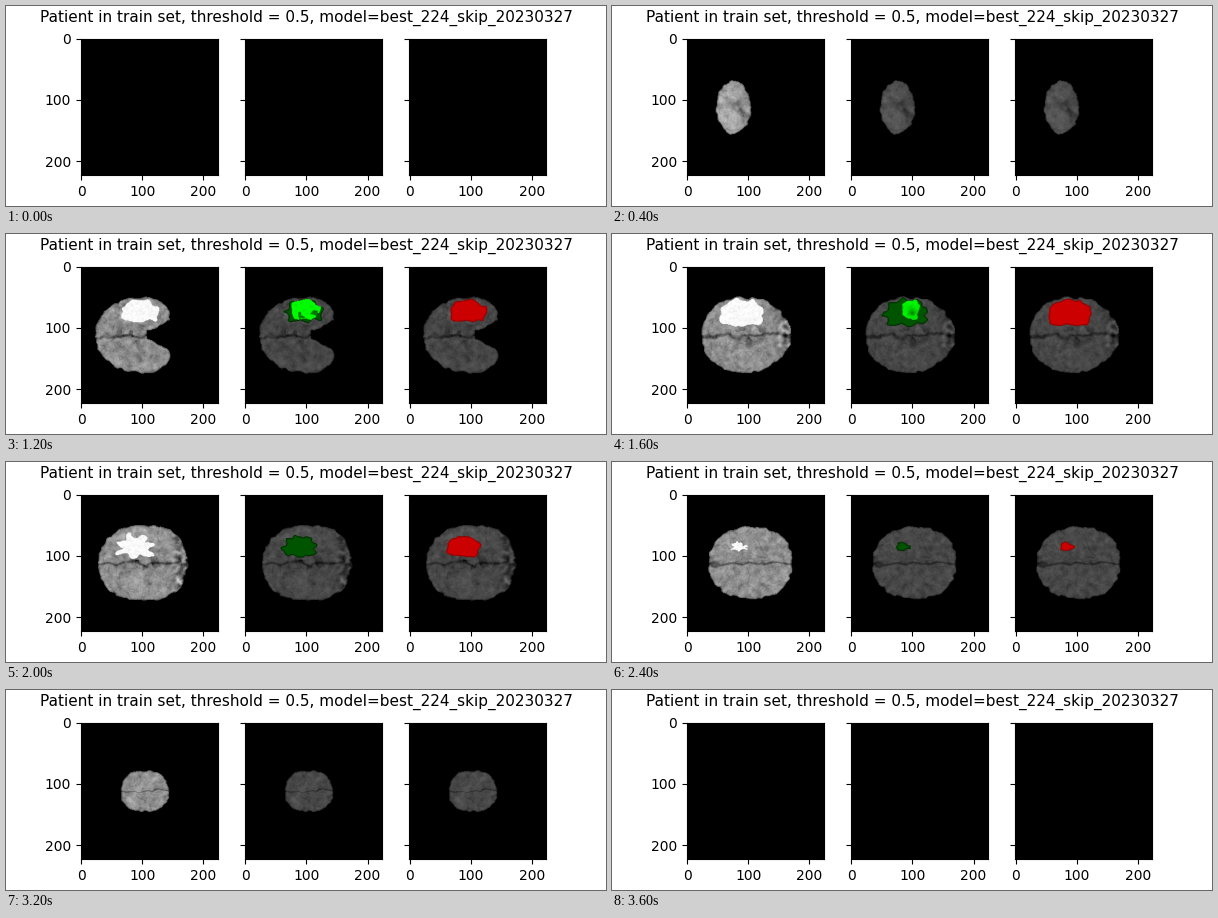
These frames come from a looping animation (600 by 200 pixels, 4 s). A matplotlib script:

```python
import numpy as np
import matplotlib.pyplot as plt
from matplotlib.animation import FuncAnimation

N = 224
STEP = 200
FRAMES = 20
LAST = 17  # last slice that shows tissue
SCALE = 136.76 / N

# pixel centres in stage coordinates of the left panel
AXIS = (np.arange(N) + 0.5) * SCALE
X, Y = np.meshgrid(75 + AXIS, 32.6 + AXIS)
FREQ = np.fft.fftfreq(N)
K2 = FREQ[:, None] ** 2 + FREQ[None, :] ** 2


def noise(rng, size):
    """Smooth random field with unit spread."""
    spec = np.fft.fft2(rng.standard_normal((N, N)))
    field = np.fft.ifft2(spec * np.exp(-20 * K2 * size ** 2)).real
    return field / field.std()


def bump(x, y, cx, cy, rx, ry):
    return np.exp(-((x - cx) / rx) ** 2 - ((y - cy) / ry) ** 2)


def erode(mask, steps):
    for _ in range(steps):
        mask = (mask & np.roll(mask, 1, 0) & np.roll(mask, -1, 0)
                & np.roll(mask, 1, 1) & np.roll(mask, -1, 1))
    return mask


def extent(i):
    """Centre and half size of the section through the head."""
    if i <= 4:
        return 121.5, 101.5, 22 - 9.5 / i, 29 - 6.5 / i
    ry = 38 * np.sqrt(1 - (abs(i - 7.5) / 9.7) ** 2.6)
    if i <= 7:
        return 126.5, 101.5, .98 * ry, ry
    return min(139, 126.5 + i), 101.5, 1.19 * ry, ry


def outline(i, u, v):
    """Egg with its own roundness at the left and right end."""
    keys = [4, 6, 8, 10, 14]
    left = np.interp(i, keys, [2, 2, 2.3, 2.3, 2.8])
    right = np.interp(i, keys, [2.2, 3.5, 1.7, 3.2, 2.3])
    peak = np.interp(i, keys, [0, .2, 0, 0, 0])
    cleft = 5 <= i <= 7
    end = 1.12 if cleft else 1
    t = np.where(u < peak, (peak - u) / (1 + peak), (u - peak) / (end - peak))
    half = np.sqrt(np.clip(1 - t ** np.where(u < peak, left, right), 0, 1))
    mask = (np.abs(v) < half) & (u < 1)
    if cleft:
        wall = .4 + .2 * (i - 6)
        mask &= (u < wall) | (np.abs(v) > .12 + .45 * (u - wall))
    return mask


def small_lobes(gray, wx, wy, texture):
    """Side lobe and the tips of the temporal lobes."""
    for cx, cy, rx, ry in [(100, 93, 6, 9), (148, 77, 6, 6),
                           (153, 86, 6, 4), (152, 119.5, 5, 5)]:
        r2 = ((wx - cx) / rx) ** 2 + ((wy - cy) / ry) ** 2
        part = (r2 < 1) & (gray == 0)
        gray[part] = (.62 - .2 * r2 + texture)[part]
    gray -= .4 * bump(X, Y, 147, 76, 3, 2)


def head(i, rng, wx, wy):
    cx, cy, rx, ry = extent(i)
    u, v = (wx - cx) / rx, (wy - cy) / ry
    mask = outline(i, u, v)
    texture = .025 * noise(rng, .9) + .04 * noise(rng, 3)
    folds = np.exp(-(noise(rng, 4) / .12) ** 2)
    gray = .57 + texture - .1 * folds

    if i <= 4:
        gray += .08 - .15 * np.clip(u, 0, 1)
        gray -= .25 * (bump(wx, wy, 125, 102, 5, 5)
                       - bump(wx, wy, 125, 102, 2.5, 2.5))
    else:
        middle = -.05 * u + .03 * noise(rng, 6)
        width = np.interp(i, [6, 11], [.05, .03])
        gray -= .25 * np.exp(-((v - middle) / width) ** 2)
    if 6 <= i <= 11:
        # hollow spaces around the centre
        gray -= .2 * (noise(rng, 4) > .6) * bump(u, v, .1, 0, .5, .25)
    if 8 <= i <= 11:
        # bone and eye sockets at the front
        front = np.clip((u - .6) * 4, 0, 1)
        gray += front * (.16 * noise(rng, 2.5) - .1)

    gray -= .14 * (mask & ~erode(mask, 2))
    gray = np.where(mask, np.clip(gray, .04, 1), 0)
    if i == 4:
        small_lobes(gray, wx, wy, texture)
    return np.clip(gray, 0, 1)


def blob(x, y, box, waves=5, depth=.06, taper=.15):
    """Rounded square with a wavy rim, wider at its foot."""
    cx, cy, rx, ry = box
    dy = (y - cy) / ry
    dx = (x - cx) / rx / (1 + taper * np.clip(dy, -1, 1))
    rim = 1 + depth * np.cos(waves * np.arctan2(dy, dx) + 1)
    return np.abs(dx) ** 2.6 + np.abs(dy) ** 2.6 < rim ** 2.6


def lesion(i):
    keys = [5, 6, 8, 10, 12]
    return [np.interp(i, keys, vals) for vals in (
        [137, 134, 130, 129, 127], [76, 77, 79, 85, 85],
        [14, 18, 21, 16, 7], [9, 11, 13, 10.5, 4])]


def paint(img, mask, color, shade):
    img[mask] = np.clip(np.array(color) * shade[mask][:, None], 0, 1)


def mark(i, rng, wx, wy, tissue, left, middle, right):
    box = lesion(i)
    late = i >= 10
    grain = noise(rng, 1)
    white = blob(wx, wy, box, 7, .25 if late else .08) & tissue
    whole = blob(wx, wy, box, 8, .1) & tissue
    red = blob(wx, wy, box) & tissue

    paint(left, white, (1, 1, 1), .98 + .02 * grain)
    paint(middle, whole, (0, .33, 0), np.where(erode(whole, 2), 1, .55))
    if not late:
        rx = np.interp(i, [6, 8], [14, 8.5])
        core = blob(wx, wy, (135, 76, rx, 10), taper=0) & tissue
        shade = 1 - .5 * (noise(rng, 3) > 1.2)
        if i >= 8:
            shade = .95 - .4 * bump(X, Y, 136, 79, 4, 4)
        paint(middle, core, (0, 1, 0), shade + .04 * grain)
    paint(right, red, (.8, 0, 0), np.where(erode(red, 2), 1, .75))


def panels(i):
    if not 1 <= i <= LAST:
        return [np.zeros((N, N, 3))] * 3
    rng = np.random.default_rng(40 + i)
    wx = X + .6 * noise(rng, 3)
    wy = Y + .6 * noise(rng, 3)
    gray = head(i, rng, wx, wy)
    left = np.repeat(gray[:, :, None], 3, axis=2)
    middle, right = left * .5, left * .5
    if 5 <= i <= 12:
        mark(i, rng, wx, wy, gray > 0, left, middle, right)
    return [left, middle, right]


fig, axes = plt.subplots(1, 3, sharey=True, figsize=(6, 2), dpi=100)
fig.suptitle("Patient in train set, threshold = 0.5, "
             "model=best_224_skip_20230327", fontsize=11)
images = [ax.imshow(np.zeros((N, N, 3))) for ax in axes]
for ax in axes:
    ax.set_xticks([0, 100, 200])
    ax.set_yticks([0, 100, 200])

scans = [panels(i) for i in range(FRAMES)]


def update(i):
    for image, data in zip(images, scans[i]):
        image.set_data(data)
    return images


anim = FuncAnimation(fig, update, frames=FRAMES, interval=STEP,
                     repeat=True, repeat_delay=0, blit=False)
plt.show()
```
